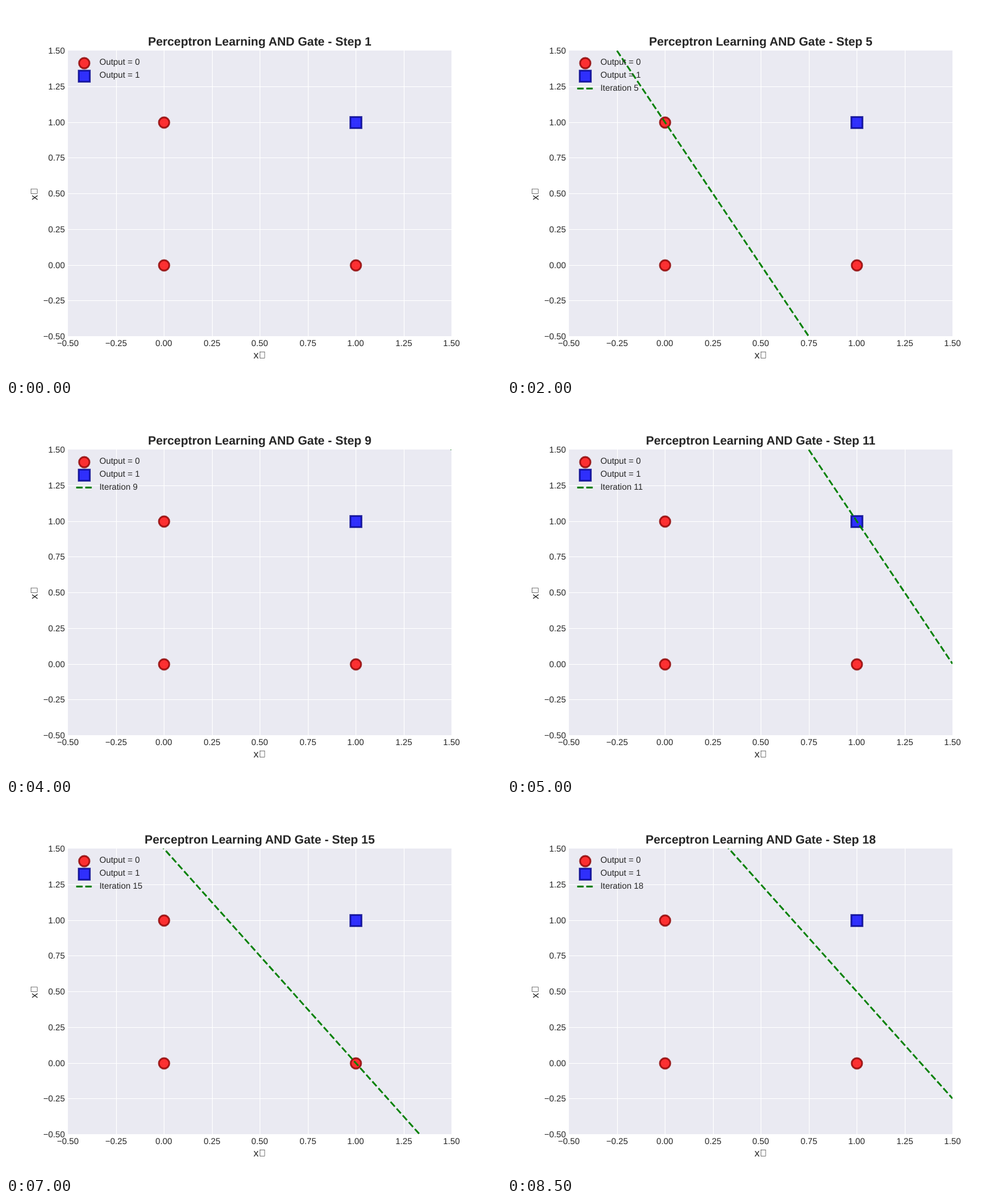
Write an HTML page that moves like this. It is 800 by 600 pixels and loops after 9 s.

```html
<!DOCTYPE html>
<html lang="en">
<head>
<meta charset="utf-8">
<title>Perceptron learning</title>
<style>
  html, body { margin: 0; width: 100%; height: 100%; overflow: hidden; background: #fff; }
  svg { display: block; width: 800px; height: 600px; }
  text { font: 13.89px "Liberation Sans", Arial, sans-serif; fill: #262626; text-rendering: geometricPrecision; }
  .title { font-size: 19.44px; font-weight: bold; }
  .axis text { font-size: 16.67px; }
  .axis rect { fill: none; stroke: #262626; stroke-width: .6; }
  .mid { text-anchor: middle; }
  .end { text-anchor: end; }
  .grid { stroke: #fff; stroke-width: 1.11; }
  .marker { fill-opacity: .8; stroke-opacity: .8; stroke-width: 2.78; }
  .zero { fill: #f00; stroke: #8b0000; }
  .one { fill: #00f; stroke: #00008b; }
  .boundary { stroke: #008000; stroke-width: 2.78; stroke-dasharray: 10.28 4.44; }
</style>
</head>
<body>
<svg viewBox="0 0 800 600">
  <clipPath id="plot"><rect x="100" y="72" width="620" height="462"/></clipPath>
  <rect x="100" y="72" width="620" height="462" fill="#eaeaf2"/>
  <g id="ticks"></g>
  <g id="points"></g>
  <line id="line" class="boundary" clip-path="url(#plot)"/>
  <g id="legend">
    <text x="151" y="95">Output = 0</text>
    <text x="151" y="116">Output = 1</text>
    <g id="lineKey">
      <line class="boundary" x1="113.5" x2="140.5" y1="133.5" y2="133.5"/>
      <text id="iteration" x="151" y="137"></text>
    </g>
  </g>
  <g class="axis" transform="translate(400 570)"><text>x</text><rect x="10.5" y="-10.5" width="7.5" height="10"/></g>
  <g class="axis" transform="translate(51 314) rotate(-90)"><text>x</text><rect x="10.5" y="-10.5" width="7.5" height="10"/></g>
  <text id="title" class="title mid" x="410" y="64"></text>
</svg>
<script>
const STEP_MS = 500;

// Weights and bias [w1, w2, b] after each update, in units of the learning rate.
const states = [
  [0, 0, -1], [1, 1, 0], [1, 1, -1], [1, 0, -2], [2, 1, -1], [2, 0, -2],
  [1, 0, -3], [2, 1, -2], [1, 1, -3], [2, 2, -2], [2, 1, -3], [3, 2, -2],
  [3, 1, -3], [2, 1, -4], [3, 2, -3], [2, 2, -4], [3, 3, -3], [3, 2, -4]
];

const byId = id => document.getElementById(id);
const toX = x => 100 + 310 * (x + 0.5);
const toY = y => 534 - 231 * (y + 0.5);
const fromY = py => (534 - py) / 231 - 0.5;

function setAttrs(el, attrs) {
  for (const name in attrs) el.setAttribute(name, attrs[name]);
  return el;
}

function add(parent, tag, attrs, text = "") {
  const el = document.createElementNS("http://www.w3.org/2000/svg", tag);
  setAttrs(el, attrs).textContent = text;
  byId(parent).append(el);
}

// Markers sit on whole pixels, centred half a pixel to the lower right.
function addMarker(parent, x, y, output) {
  const cx = Math.round(x) + 0.5, cy = Math.round(y) + 0.5;
  if (output) add(parent, "rect", { class: "marker one", x: cx - 9, y: cy - 9, width: 18, height: 18 });
  else add(parent, "circle", { class: "marker zero", cx, cy, r: 8.5 });
}

function drawStatic() {
  for (let i = 0; i <= 8; i++) {
    const value = -0.5 + i / 4;
    const label = value.toFixed(2).replace("-", "\u2212");
    const x = Math.round(toX(value)), y = Math.round(toY(value));
    if (i > 0 && i < 8) {
      add("ticks", "line", { class: "grid", x1: x + 0.5, x2: x + 0.5, y1: 72, y2: 534 });
      add("ticks", "line", { class: "grid", x1: 100, x2: 720, y1: y + 0.5, y2: y + 0.5 });
    }
    add("ticks", "text", { class: "mid", x, y: 550 }, label);
    add("ticks", "text", { class: "end", x: 95.3, y: y + 5 }, label);
  }
  for (const a of [0, 1]) for (const b of [0, 1]) addMarker("points", toX(a), toY(b), a & b);
  addMarker("legend", 126, 92, 0);
  addMarker("legend", 126, 113, 1);
}

function showStep(index) {
  const [w1, w2, b] = states[index];
  const visibility = w2 ? "visible" : "hidden";
  byId("title").textContent = `Perceptron Learning AND Gate - Step ${index + 1}`;
  byId("iteration").textContent = `Iteration ${index + 1}`;
  setAttrs(byId("lineKey"), { visibility });
  setAttrs(byId("line"), { visibility });
  if (!w2) return;

  // Dashes start at the left limit or just above the stage, whichever is further right.
  const yAt = x => toY(-(w1 * x + b) / w2);
  const startX = Math.max(-0.5, -(w2 * fromY(-1) + b) / w1);
  setAttrs(byId("line"), { x1: toX(startX), y1: yAt(startX), x2: toX(1.5), y2: yAt(1.5) });
}

let shown = -1;
function tick() {
  const index = Math.floor(performance.now() / STEP_MS) % states.length;
  if (index !== shown) showStep(shown = index);
  requestAnimationFrame(tick);
}

drawStatic();
tick();
</script>
</body>
</html>
```
